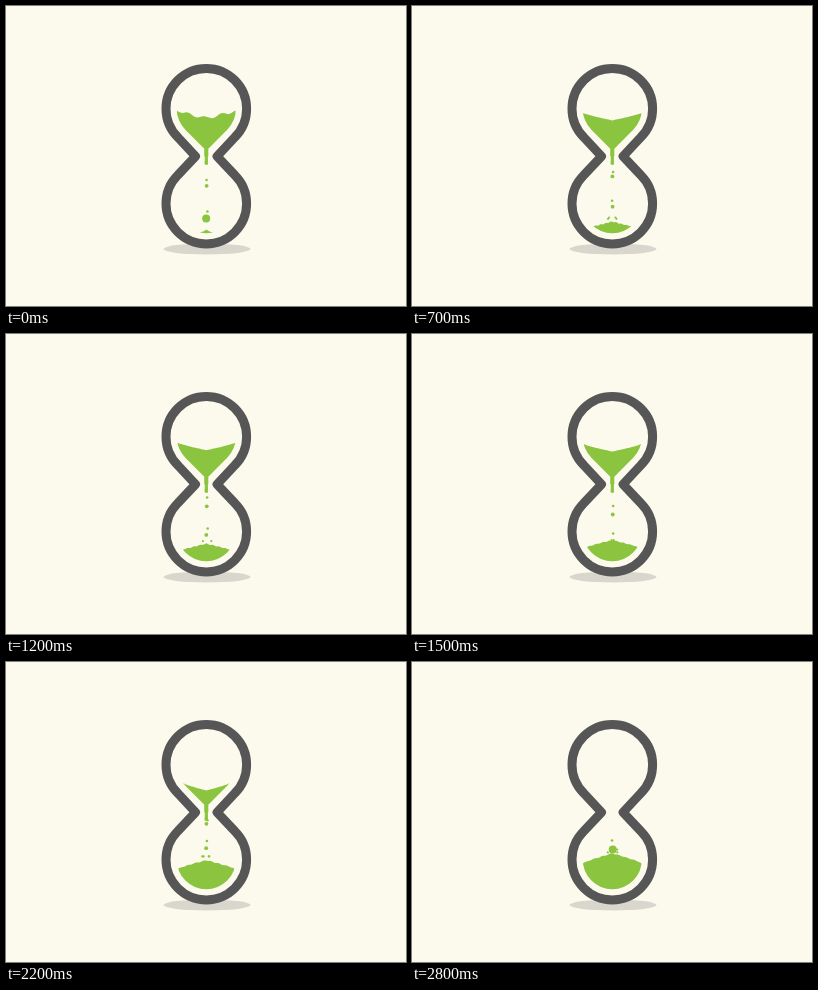
Animation, 400 px wide and 300 px high, one loop 2900 ms. Source, as an HTML page with a canvas:

```html
<!DOCTYPE html>
<html lang="en">
<head>
<meta charset="utf-8">
<title>Hourglass</title>
<style>
  html, body { margin: 0; width: 100%; height: 100%; overflow: hidden; background: #fbfaec; }
  canvas { display: block; }
</style>
</head>
<body>
<canvas id="stage" width="400" height="300"></canvas>
<script>
const ctx = document.getElementById('stage').getContext('2d');
const LOOP = 2900, STEP = 100;
const CX = 200.3, TOP = 102.7, NECK = 150.3, BOTTOM = 197.6;
const SAND_R = 29.6, SPOUT = 157, FALL = 0.12, LAST_DROP = 12;

const random = seed => Math.abs(Math.sin(seed * 127.1 + 3.7) * 43758.5) % 1;
const chord = dy => Math.sqrt(Math.max(0, SAND_R ** 2 - dy ** 2));

function glassPath(r, neck, gap) {
  const q = Math.PI / 4;
  ctx.beginPath();
  ctx.arc(CX, TOP, r, 3 * q, q);
  ctx.lineTo(CX + neck, NECK - gap);
  ctx.lineTo(CX + neck, NECK + gap);
  ctx.arc(CX, BOTTOM, r, -q, 5 * q);
  ctx.lineTo(CX - neck, NECK + gap);
  ctx.lineTo(CX - neck, NECK - gap);
  ctx.closePath();
}

function dot(x, y, r) {
  ctx.beginPath();
  ctx.arc(x, y, r, 0, 7);
  ctx.fill();
}

// Fills from a surface, rising or dipping by `lift` in the middle, to `base`.
function sand(half, rim, lift, power, base, ripple) {
  ctx.beginPath();
  for (let u = -1; u <= 1; u += 1 / 16) {
    const d = 1 - Math.abs(u);
    ctx.lineTo(CX + u * half, rim + lift * d ** power + ripple(u) * Math.min(1, d * 4));
  }
  ctx.lineTo(CX + half, base);
  ctx.lineTo(CX - half, base);
  ctx.fill();
}

// The level sinks slowly, then rushes as the funnel narrows.
function drawUpper(s) {
  const rim = 104.5 + 3.4 * s + 9 * (s / 2.2) ** 8;
  if (rim > 142) return;
  const half = rim < 123.6 ? chord(rim - TOP) : 144.5 - rim;
  const wave = 1.5 * Math.max(0, 1 - s * 3);
  sand(half, rim, Math.min(7.5, 143 - rim), 0.8, NECK, u => wave * Math.sin(u * 11 - 1));
  ctx.fillRect(CX - 1.6, 141, 3.2, SPOUT - 141);
  dot(CX, SPOUT, 2);
}

function drawLower(s) {
  const rim = 226.5 - 9 * s, rise = 3 + 2.5 * s;
  const power = Math.max(0.85, 1.5 - 0.5 * s);
  sand(chord(rim - BOTTOM), rim, -rise, power, 230, u => 0.4 * Math.sin(u * 23 + s * 9));
  return rim - rise;
}

function drawDrop(t, start, x, r, peak) {
  const y = SPOUT + (t - start) * FALL;
  const splash = (y - peak - 2) / 18;
  if (t < start || splash > 1) return;
  if (splash < 0) return dot(x, y, r);
  for (const side of [-1, 1]) {
    dot(x + side * (1 + 4 * splash), peak - 16 * splash * (1 - splash), 1.1);
  }
}

// Drops leave faster and faster, each trailed by a smaller one.
function drawDrops(t, peak) {
  for (let k = -1; k <= LAST_DROP; k++) {
    const start = -190 + 270 * k - 3.5 * k * k;
    const big = k < 0 || k === LAST_DROP;
    drawDrop(t, start, CX + random(k) - 0.5, big ? 4 : 1.9, peak);
    drawDrop(t, start + 30 + 50 * random(k + 40), CX + 2 * random(k + 80) - 0.5, 1.3, peak);
  }
}

function draw(t) {
  const s = t / 1000;
  ctx.fillStyle = '#fbfaec';
  ctx.fillRect(0, 0, 400, 300);
  ctx.fillStyle = '#d9d7cd';
  ctx.beginPath();
  ctx.ellipse(201, 243, 43.5, 5.5, 0, 0, 7);
  ctx.fill();

  ctx.lineJoin = 'round';
  ctx.strokeStyle = '#565656';
  ctx.lineWidth = 9;
  glassPath(40.3, 10.8, 0);
  ctx.stroke();

  ctx.fillStyle = '#8bc53f';
  ctx.save();
  glassPath(SAND_R, 2, 7.5);
  ctx.clip();
  const peak = drawLower(s);
  drawUpper(s);
  ctx.restore();
  drawDrops(t, peak);
}

const begin = performance.now();
function tick() {
  const t = (performance.now() - begin) % LOOP;
  draw(Math.floor(t / STEP) * STEP);
  requestAnimationFrame(tick);
}
tick();
</script>
</body>
</html>
```
